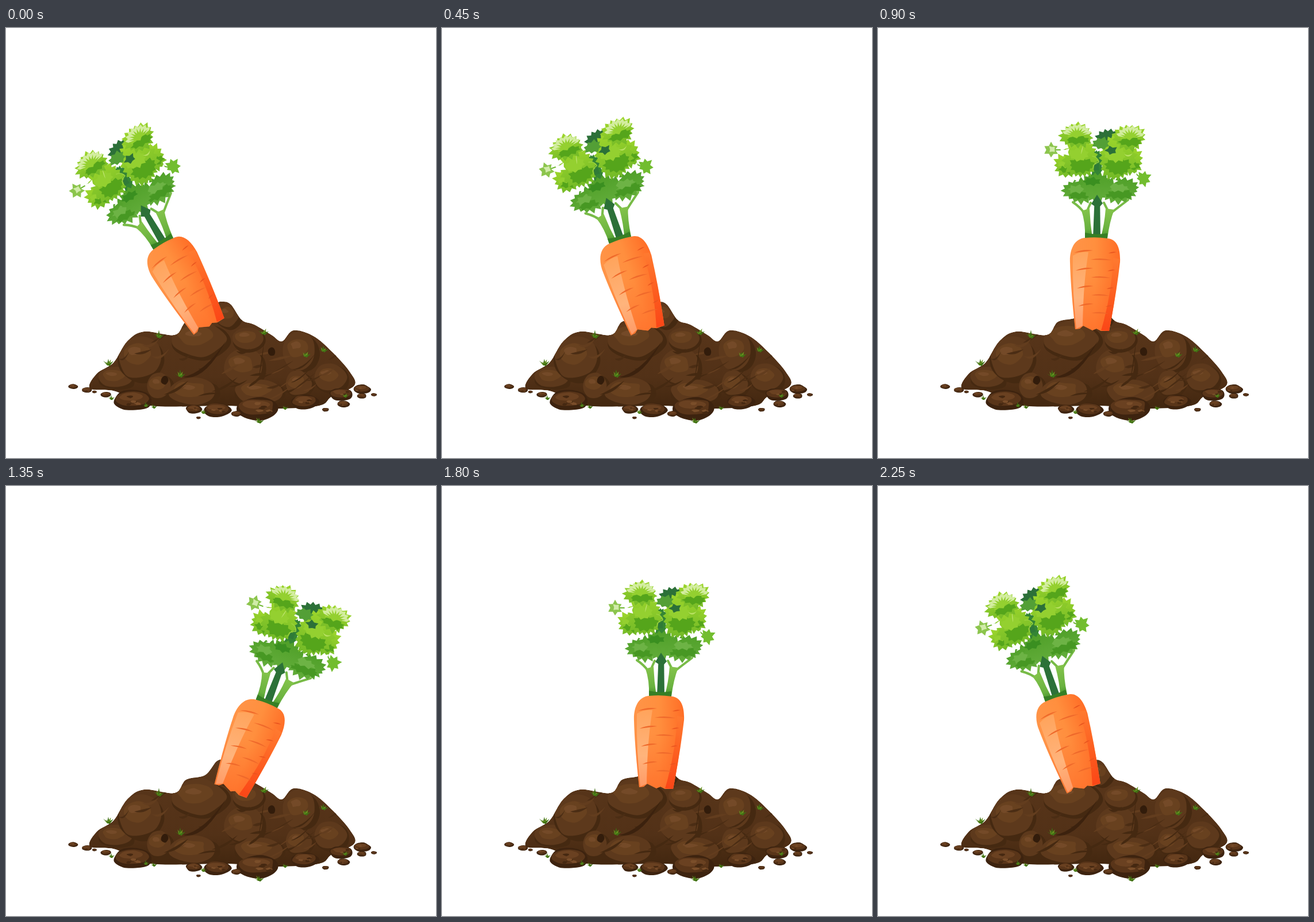
Write an HTML page that moves like this. It is 748 px wide and 748 px high and loops after 2700 ms.

```html
<!DOCTYPE html>
<html lang="en">
<head>
<meta charset="utf-8">
<title>Carrot in soil</title>
<style>
  html, body { margin: 0; width: 100%; height: 100%; overflow: hidden; background: #fff; }
  svg { display: block; width: 100%; height: 100%; }
</style>
</head>
<body>
<svg viewBox="0 0 748 748">
  <defs>
    <linearGradient id="skin">
      <stop offset="0" stop-color="#ff9448"/><stop offset=".5" stop-color="#ff8f3e"/>
      <stop offset="1" stop-color="#ff6d26"/>
    </linearGradient>
    <linearGradient id="warm" x2="0" y2="1">
      <stop offset=".4" stop-color="#ff5a1c" stop-opacity="0"/><stop offset="1" stop-color="#ff5a1c" stop-opacity=".5"/>
    </linearGradient>
    <linearGradient id="side" x2="0" y2="1">
      <stop offset="0" stop-color="#ff7a30"/><stop offset=".6" stop-color="#fc5a1e"/><stop offset="1" stop-color="#fb4617"/>
    </linearGradient>
    <linearGradient id="shine" x2="0" y2="1">
      <stop offset="0" stop-color="#ffa45c"/><stop offset=".6" stop-color="#ffb47c"/><stop offset="1" stop-color="#ff9a66"/>
    </linearGradient>
    <linearGradient id="lime" x2="0" y2="1">
      <stop offset="0" stop-color="#9fd72c"/><stop offset="1" stop-color="#72b927"/>
    </linearGradient>
    <linearGradient id="fern" x2="0" y2="1">
      <stop offset="0" stop-color="#4f9f28"/><stop offset="1" stop-color="#63ad3b"/>
    </linearGradient>
    <linearGradient id="stem" x2="0" y2="1">
      <stop offset="0" stop-color="#84c44b"/><stop offset=".7" stop-color="#69b13f"/><stop offset="1" stop-color="#3f8d2a"/>
    </linearGradient>
    <linearGradient id="earth" x2="0" y2="1">
      <stop offset="0" stop-color="#5a371b"/><stop offset=".7" stop-color="#523117"/><stop offset="1" stop-color="#41260f"/>
    </linearGradient>
    <clipPath id="inside"></clipPath>
  </defs>
  <g id="mound" clip-path="url(#inside)"></g>
  <g id="foot"></g>
  <g id="carrot"></g>
</svg>
<script>
const [inside, mound, foot, carrot] = ['inside', 'mound', 'foot', 'carrot'].map(id => document.getElementById(id));

let seed = 7;
const random = (low, high) => {
  seed = (seed * 16807) % 2147483647;
  return low + (high - low) * seed / 2147483647;
};

const fixed = values => values.map(v => v.toFixed(1)).join(' ');
const polygon = list => 'M' + list.map(fixed).join('L') + 'Z';

function paint(layer, fill, d, stroke = 'none', width = 1) {
  const path = document.createElementNS('http://www.w3.org/2000/svg', 'path');
  Object.entries({ fill, d, stroke, 'stroke-width': width, 'stroke-linecap': 'round' })
    .forEach(([name, value]) => path.setAttribute(name, value));
  layer.append(path);
}

// Closed smooth curve through every point.
function smooth(list) {
  const at = i => list[(i + list.length) % list.length];
  return 'M' + fixed(list[0]) + list.map((p, i) => {
    const [before, next, after] = [at(i - 1), at(i + 1), at(i + 2)];
    const c1 = p.map((v, k) => v + (next[k] - before[k]) / 6);
    const c2 = next.map((v, k) => v - (after[k] - p[k]) / 6);
    return 'C' + fixed([...c1, ...c2, ...next]);
  }).join('') + 'Z';
}

const ring = (count, point) => Array.from({ length: count }, (_, i) => point(i * 2 * Math.PI / count, i));
const polar = (x, y, rx, ry, angle, r = 1) => [x + rx * r * Math.cos(angle), y + ry * r * Math.sin(angle)];
const oval = (x, y, rx, ry, rough = 0) =>
  smooth(ring(9, a => polar(x, y, rx, ry, a, 1 + random(-rough, rough))));

// Crescent from one point to another, bulging upwards.
function crescent(layer, fill, x1, y1, x2, y2, bend, thick) {
  const mx = (x1 + x2) / 2, my = (y1 + y2) / 2 - bend;
  paint(layer, fill, `M${x1} ${y1}Q${mx} ${my} ${x2} ${y2}Q${mx} ${my + thick} ${x1} ${y1}Z`);
}

function lump(x, y, rx, ry) {
  paint(mound, '#452911', oval(x + 4, y + 5, rx, ry, .08));
  paint(mound, '#5d391c', oval(x, y, rx * .95, ry * .95, .08));
  paint(mound, '#68411f', oval(x - rx * .1, y - ry * .15, rx * .6, ry * .5, .15));
  paint(mound, '#744a28', oval(x - rx * .2, y - ry * .3, rx * .28, ry * .18, .2));
}

function stone(x, y, r) {
  const ry = r * .54;
  paint(foot, '#3d230f', oval(x, y, r, ry, .08));
  paint(foot, '#593519', oval(x - r * .06, y - ry * .16, r * .86, ry * .74, .1));
  if (r < 7) return;
  paint(foot, '#6a4121', oval(x - r * .1, y - ry * .38, r * .62, ry * .36, .15));
  for (let i = 0; i < r / 6; i++) {
    paint(foot, i % 2 ? '#452811' : '#7a4e2a', oval(x + random(-.6, .6) * r, y + random(-.5, .5) * ry, r * .16, ry * .12, .3));
  }
}

function tuft(x, y, size) {
  for (let i = -2; i <= 2; i++) {
    const tipX = x + i * size * .5, tipY = y - size * random(.6, 1.5) / (1 + Math.abs(i) * .4);
    paint(foot, i % 2 ? '#64901f' : '#3f7014', `M${x - size * .3} ${y}L${fixed([tipX, tipY])}L${x + size * .3} ${y + size * .2}Z`);
  }
}

// The front edge of the heap is a shallow arc on which the stones lie.
const arc = x => 622 + 43 * Math.sin(Math.PI * (x - 110) / 535);

function drawSoil() {
  const outline = smooth(`146,627 158,601 187,582 211,545 240,528 294,534 313,511 346,503 366,479 378,476
    391,481 410,508 432,516 462,534 480,545 500,526 535,536 567,563 598,598 606,622 567,641 545,657
    470,662 380,657 250,657 190,632`.trim().split(/\s+/).map(pair => pair.split(',').map(Number)));
  paint(inside, '#000', outline);
  paint(mound, 'url(#earth)', outline);

  [[190, 607, 32, 18], [232, 573, 40, 38], [334, 541, 50, 32], [385, 499, 22, 21], [266, 622, 22, 23],
   [325, 632, 44, 25], [412, 588, 36, 32], [420, 540, 28, 20], [440, 632, 44, 22], [510, 562, 30, 34],
   [508, 618, 24, 22], [563, 607, 30, 24]].forEach(args => lump(...args));

  // Folds slant up to the right, as the soil has slid down from the top
  for (let i = 0; i < 34; i++) {
    const x = random(175, 570), y = random(545, 650), length = random(18, 46);
    const fill = ['#452911', '#4b2d14', '#633d1e'][i % 3];
    crescent(mound, fill, x, y, x + length, y - length * random(.1, .8), random(-12, 8), random(5, 12));
  }
  crescent(mound, '#3c220e', 308, 607, 382, 545, -24, 16);
  crescent(mound, '#40260f', 440, 606, 449, 545, 4, 22);
  [276, 462].forEach((x, i) => paint(mound, '#321c0b', oval(x, 613 - i * 50, 6, 8, .1)));

  [[117, 8], [141, 9], [154, 4], [174, 9], [220, 33], [327, 14], [368, 23], [438, 36],
   [520, 24], [583, 20], [619, 15]].forEach(([x, r]) => stone(x, arc(x), r));
  [[335, 678], [401, 671], [556, 664], [587, 654], [619, 640], [640, 638]]
    .forEach(([x, y], i) => stone(x, y, 4 + i * 5 % 8));
  [[266, 538], [178, 586], [448, 532], [521, 571], [552, 562], [303, 606], [440, 686]]
    .forEach(([x, y]) => tuft(x, y, 9));
  [183, 243, 257, 343, 485, 590].forEach(x => tuft(x, arc(x) + 6, 6));
}

// Leaf outline with pointed teeth and slow bumps.
const toothed = (x, y, rx, ry, depth = 5) => {
  const teeth = Math.round((rx + ry) * .36);
  return polygon(ring(teeth * 2, (a, i) => {
    const bump = 1 + .07 * Math.sin(3 * a + x);
    const tip = i % 2 ? depth * random(.6, 1.3) : -1;
    return polar(x, y, rx + tip, ry + tip, a, bump);
  }));
};

const leaf = (fill, x, y, rx, ry, depth) => paint(carrot, fill, toothed(x, y, rx, ry, depth));

function bush(x, y, rx, ry, fill, shade, light) {
  leaf(fill, x, y, rx, ry);
  leaf(shade, x + 2, y + ry * .42, rx * .72, ry * .36, 3);
  leaf(light, x - 3, y - ry * .15, rx * .6, ry * .3, 3);
}

// Pale spiky band around the upper edge of a leaf.
function crown(x, y, rx, ry) {
  const spikes = 17, at = i => Math.PI * (1.05 + .9 * i / (spikes - 1));
  const band = (odd, even) => Array.from({ length: spikes }, (_, i) => polar(x, y, rx, ry, at(i), i % 2 ? odd : even));
  paint(carrot, '#d3eda0', polygon([...band(1.08, .88), ...band(.8, .42).reverse()]));
}

function drawStems() {
  paint(carrot, 'none', 'M359 322Q351 311 339 303M362 322L370 304M402 322L393 304M405 322Q419 311 435 299', '#78bb47', 4);
  paint(carrot, '#2c7138', 'M374 365L377 290H386L387 365Z');
  paint(carrot, 'url(#stem)', 'M360 365Q361 338 354 318L368 314Q369 340 373 365Z');
  paint(carrot, 'url(#stem)', 'M387 366Q394 342 396 314L411 316Q403 336 399 366Z');
  paint(carrot, '#377f25', 'M360 356Q379 361 399 357V369H360Z');
}

function drawLeaves() {
  const lime = ['url(#lime)', '#55a51b', '#94d030'], fern = ['url(#fern)', '#479823', '#6db345'];
  paint(carrot, 'none', 'M445 250L458 262M304 212L330 212', '#6cb52e', 2);
  leaf('#2c7038', 400, 193, 18, 15, 4);
  leaf('#348534', 380, 240, 10, 28, 2);
  bush(350, 283, 25, 18, ...fern);
  bush(418, 281, 32, 19, ...fern);
  leaf('url(#fern)', 380, 276, 24, 22, 4);
  leaf('#3a8f20', 372, 267, 13, 6, 3);
  paint(carrot, '#2c7138', 'M371 306L381 290L391 305L383 314Z');

  bush(329, 239, 20, 17, ...lime);
  bush(352, 225, 27, 33, ...lime);
  bush(345, 187, 25, 18, ...lime);
  bush(438, 231, 20, 20, ...lime);
  bush(416, 226, 29, 35, ...lime);
  bush(437, 190, 25, 19, ...lime);
  crown(346, 187, 25, 19);
  crown(439, 191, 24, 20);
  crescent(carrot, '#c7e87e', 353, 220, 357, 205, -3, -9);
  crescent(carrot, '#b8e162', 428, 219, 443, 218, -10, -5);

  leaf('#2c7038', 406, 213, 8, 6, 3);
  leaf('#539f36', 388, 201, 13, 9, 3);
  leaf('#2f7a38', 380, 242, 5, 6, 2);
  paint(carrot, 'none', 'M373 223Q382 224 384 233Q374 236 374 244', '#9bd23e', 1.5);

  leaf('#fff', 325, 216, 7, 5, 4);
  paint(carrot, '#fff', 'M342 268L351 261L349 267ZM409 263L418 266L410 270ZM443 255L450 250L449 260Z');
  leaf('#8cc54d', 301, 212, 9, 9, 4);
  leaf('#d0eba8', 303, 211, 5, 5, 2);
  leaf('#72bd2f', 462, 262, 9, 10, 4);
}

function drawRoot() {
  const outline = 'M343 524Q335 450 334 408C333 386 341 366 361 365Q380 363 399 366C416 367 422 384 421 407Q415 460 402 527L388 527L380 523L373 526L357 518L351 523Z';
  paint(carrot, 'url(#skin)', outline);
  paint(carrot, 'url(#warm)', outline);
  paint(carrot, 'url(#shine)', 'M339 396Q353 388 366 390Q357 444 356 518L345 523Q338 460 339 396Z');
  paint(carrot, 'url(#side)', 'M420 402Q415 460 402 527L388 526Q407 463 409 400Z');

  // Creases alternate between the two sides and shorten with the taper
  for (let y = 391; y < 515; y += 31) {
    const half = 41 - (y - 391) * .09;
    crescent(carrot, '#ef692b', 378 - half * .9, y, 378 - half * .1, y - 4, 5, 5);
    crescent(carrot, '#ef692b', 378 - half * .2, y + 12, 378 + half * .7, y + 13, 5, 5);
    crescent(carrot, '#e9551f', 378 + half * .55, y + 1, 378 + half * .9, y - 1, 3, 4);
  }
}

drawSoil();
drawStems();
drawLeaves();
drawRoot();

// Each pose is an angle and the place of the carrot's middle.
const home = { angle: 0, x: 366.5, y: 340.5 };
const farLeft = { angle: -31.4, x: 249, y: 360.5 };
const left = { angle: -19.4, x: 288.9, y: 349.3 };
const right = { angle: 20, x: 449.5, y: 350.3 };
const sway = [farLeft, left, home, right, home, left];
const HOLD = 450;

function frame(now) {
  const { angle, x, y } = sway[Math.floor(now / HOLD) % sway.length];
  const scale = angle ? 1.025 : 1;
  carrot.setAttribute('transform', `translate(${x} ${y}) rotate(${angle}) scale(${scale}) translate(${-home.x} ${-home.y})`);
  requestAnimationFrame(frame);
}
frame(0);
</script>
</body>
</html>
```
